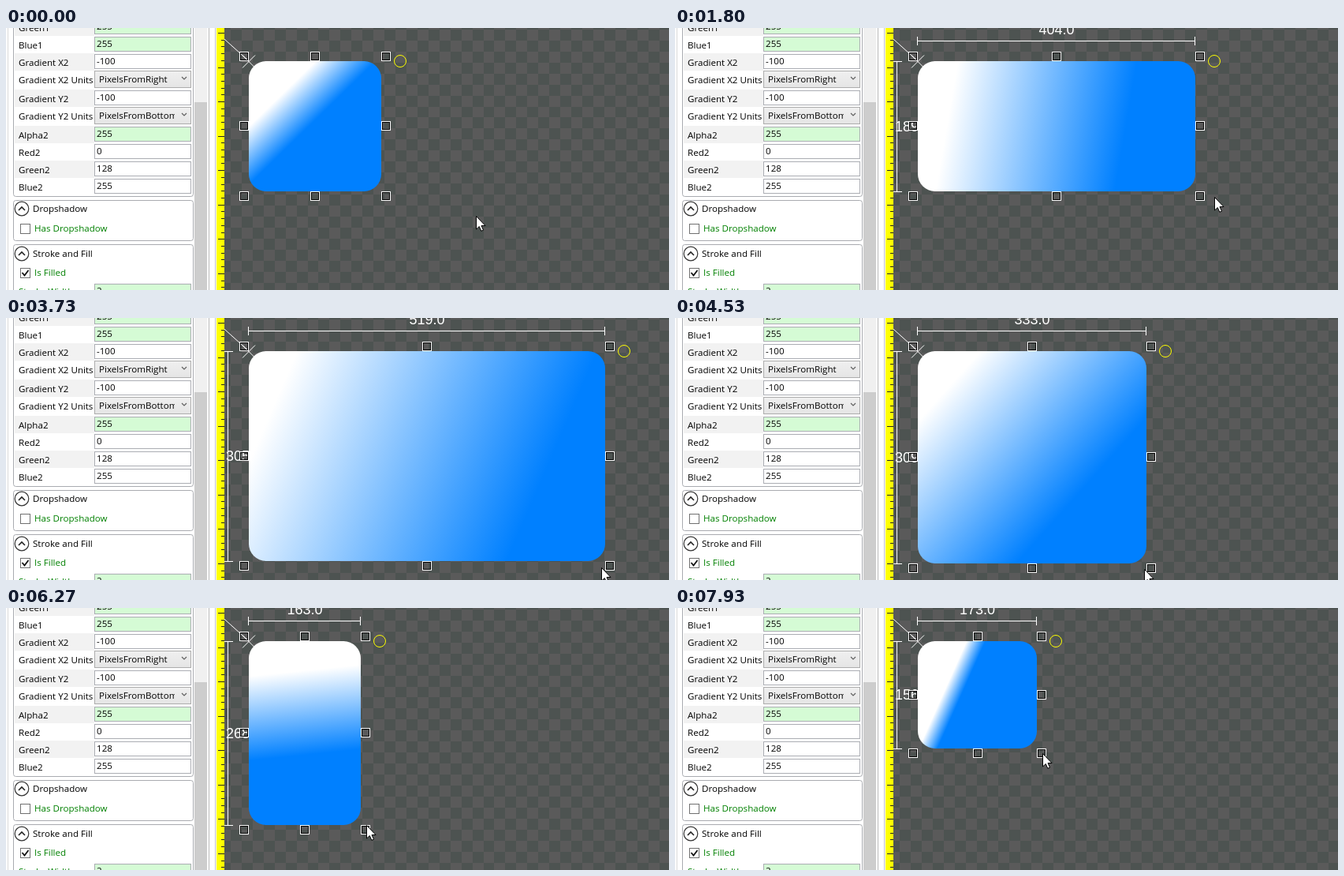
An HTML page with a canvas for the animation above (8 s loop, 841 by 332 pixels).

```html
<!DOCTYPE html>
<html lang="en">
<head>
<meta charset="utf-8">
<title>Gradient resize</title>
<style>
  html, body { margin: 0; width: 100%; height: 100%; overflow: hidden; background: #fff; }
  canvas { display: block; width: 841px; height: 332px; }
</style>
</head>
<body>
<canvas id="stage" width="841" height="332"></canvas>
<script>
const W = 841, H = 332, LOOP = 8000, STEP = 200 / 3;
const ctx = document.getElementById('stage').getContext('2d');

const UI_FONT = '11.6px "Open Sans", "Noto Sans", sans-serif';
const DIM_FONT = '18px "Liberation Sans", Arial, sans-serif';
const LEFT = 308, TOP = 42, ZOOM = 0.871, VIEW_X = 277;
const GRAB_AT = 460, REST = { x: 597, y: 238 };

// Where the dragged corner passes.
const DRAG = [
  { t: 800, x: 476, y: 207 },
  { t: 1200, x: 518, y: 207 },
  { t: 1600, x: 611, y: 207 },
  { t: 2533, x: 801, y: 209 },
  { t: 3333, x: 808, y: 283 },
  { t: 3733, x: 760, y: 308 },
  { t: 4200, x: 653, y: 312 },
  { t: 5067, x: 525, y: 309 },
  { t: 5533, x: 474, y: 305 },
  { t: 5933, x: 454, y: 299 },
  { t: 6867, x: 447, y: 216 },
  { t: 8067, x: 459, y: 177 }
];

function rate(i, axis) {
  const a = DRAG[i], b = DRAG[i + 1];
  return (b[axis] - a[axis]) / (b.t - a.t);
}

// Slope at a point that never overshoots its neighbours.
function slope(i, axis) {
  if (i === 0 || i === DRAG.length - 1) return 0;
  const a = rate(i - 1, axis), b = rate(i, axis);
  return a * b > 0 ? 2 * a * b / (a + b) : 0;
}

function cornerAt(t) {
  let i = 0;
  while (i < DRAG.length - 2 && t >= DRAG[i + 1].t) i++;
  const a = DRAG[i], b = DRAG[i + 1], span = b.t - a.t;
  const u = Math.max(0, Math.min(1, (t - a.t) / span));
  const s = u * u * (3 - 2 * u);
  const along = axis => Math.round(a[axis] + (b[axis] - a[axis]) * s +
    span * u * (1 - u) * ((1 - u) * slope(i, axis) - u * slope(i + 1, axis)));
  return { x: along('x'), y: along('y') };
}

// The pointer is one step ahead of the corner it drags.
function pointerAt(t) {
  const lead = cornerAt(t + STEP);
  const u = Math.min(1, t / GRAB_AT);
  const far = 1 - u * u * (3 - 2 * u);
  const x = lead.x + 8, y = lead.y + 7;
  return { x: Math.round(x + (REST.x - x) * far), y: Math.round(y + (REST.y - y) * far) };
}

function fill(color, x, y, w, h) {
  ctx.fillStyle = color;
  ctx.fillRect(x, y, w, h);
}

function box(x, y, w, h, border, inside) {
  if (inside) fill(inside, x, y, w, h);
  ctx.strokeStyle = border;
  ctx.lineWidth = 1;
  ctx.strokeRect(x + 0.5, y + 0.5, w - 1, h - 1);
}

function path(points, color, width = 1) {
  ctx.beginPath();
  points.forEach(([x, y]) => ctx.lineTo(x, y));
  ctx.strokeStyle = color;
  ctx.lineWidth = width;
  ctx.stroke();
}

function ring(x, y, r, color, width) {
  ctx.beginPath();
  ctx.arc(x, y, r, 0, Math.PI * 2);
  ctx.strokeStyle = color;
  ctx.lineWidth = width;
  ctx.stroke();
}

function label(text, x, middle, color = '#000') {
  ctx.font = UI_FONT;
  ctx.textAlign = 'left';
  ctx.fillStyle = color;
  ctx.fillText(text, x, middle + 4);
}

function group(y, h) {
  ctx.beginPath();
  ctx.roundRect(9.5, y + 0.5, 228, h, 3);
  ctx.fillStyle = '#fff';
  ctx.fill();
  ctx.strokeStyle = '#a9abb0';
  ctx.lineWidth = 1;
  ctx.stroke();
}

function header(text, y) {
  ring(20, y, 8.8, '#333', 1.2);
  path([[16, y + 2], [20, y - 2], [24, y + 2]], '#222', 1.6);
  label(text, 34, y);
}

function checkbox(text, y, checked) {
  box(18, y - 6, 13, 13, '#707070', '#fff');
  if (checked) path([[20.5, y], [23.5, y + 3.5], [28.5, y - 3]], '#111', 1.8);
  label(text, 36, y, '#008000');
}

function field(value, y, green) {
  box(112, y, 123, 19, '#abadb3', green ? '#d5fbd5' : '#fff');
  label(value, 115, y + 8.5);
}

function combo(value, y) {
  const shade = ctx.createLinearGradient(0, y, 0, y + 22);
  shade.addColorStop(0, '#f0f0f0');
  shade.addColorStop(1, '#e5e5e5');
  box(112, y, 123, 22, '#acacac', shade);
  ctx.save();
  ctx.beginPath();
  ctx.rect(116, y, 98, 22);
  ctx.clip();
  label(value, 118, y + 10.5);
  ctx.restore();
  path([[223, y + 8], [226, y + 11], [229, y + 8]], '#606060', 1.2);
}

const ROWS = {
  'Green1': '255',
  'Blue1': '255',
  'Gradient X2': '-100',
  'Gradient X2 Units': 'PixelsFromRight',
  'Gradient Y2': '-100',
  'Gradient Y2 Units': 'PixelsFromBottom',
  'Alpha2': '255',
  'Red2': '0',
  'Green2': '128',
  'Blue2': '255'
};
const GREEN = ['Green1', 'Blue1', 'Alpha2'];

function drawRows() {
  let y = -12;
  Object.entries(ROWS).forEach(([name, value], i) => {
    const isCombo = name.endsWith('Units');
    const h = isCombo ? 24 : 22;
    if (i % 2 === 0) fill('#f2f2f2', 11, y, 101, h);
    label(name, 16, y + 11.5);
    if (isCombo) combo(value, y);
    else field(value, y + 1, GREEN.includes(name));
    y += h;
  });
}

function drawPanel() {
  fill('#fff', 0, 0, 267, H);
  fill('#d9d9d9', 2, 0, 1, H);
  group(-20, 233);
  drawRows();

  group(218, 51);
  header('Dropshadow', 229);
  checkbox('Has Dropshadow', 254, false);

  group(274, 80);
  header('Stroke and Fill', 286);
  checkbox('Is Filled', 310, true);
  field('2', 324, true);
  label('Stroke Width', 16, 334, '#008000');

  fill('#f0f0f0', 239, 0, 16, H);
  fill('#cdcdcd', 239, 94, 16, H);
  fill('#b8b8b8', 257, 0, 1, H);
  fill('#c4c4c4', 265, 0, 1, H);
}

function drawRuler() {
  fill('#ff0', 267, 0, 10, H);
  for (let i = 0; i < 39; i++) {
    const w = i % 5 ? 4 : 8;
    fill('#222', VIEW_X - w, Math.round(6 + i * 10 * ZOOM), w, 1);
  }
}

function drawChecker() {
  const size = 16 * ZOOM;
  const colX = c => Math.round(285 + c * size);
  const rowY = r => Math.round(2 + r * size);
  fill('#4d5351', VIEW_X, 0, W - VIEW_X, H);
  for (let r = -1; r < 25; r++) {
    for (let c = -1; c < 41; c++) {
      if ((r + c) % 2) fill('#5a5a5a', colX(c), rowY(r), colX(c + 1) - colX(c), rowY(r + 1) - rowY(r));
    }
  }
}

function drawDims(right, bottom) {
  const size = length => Math.round(length / ZOOM).toFixed(1);
  fill('#fff', LEFT, 16, right - LEFT, 1);
  fill('#fff', 281, TOP, 1, bottom - TOP);
  for (const x of [LEFT - 1, right - 1]) fill('#fff', x, 11, 1, 11);
  for (const y of [TOP, bottom]) fill('#fff', VIEW_X, y, 11, 1);
  ctx.font = DIM_FONT;
  ctx.textAlign = 'center';
  ctx.fillText(size(right - LEFT), (LEFT + right) / 2, 8);
  ctx.textAlign = 'left';
  ctx.fillText(size(bottom - TOP), 279, (TOP + bottom) / 2 + 6);
}

function drawShape(right, bottom) {
  const inset = 100 * ZOOM;
  const blend = ctx.createLinearGradient(LEFT + 44, TOP + 40, right - inset, bottom - inset);
  blend.addColorStop(0, '#fff');
  blend.addColorStop(1, '#0080ff');
  ctx.beginPath();
  ctx.roundRect(LEFT, TOP, right - LEFT, bottom - TOP, 25 * ZOOM);
  ctx.fillStyle = blend;
  ctx.fill();
}

function drawHandles(right, bottom) {
  path([[262, 0.5], [LEFT, TOP]], '#fff');
  path([[300, 34.5], [316, 50.5]], '#fff');
  path([[300, 50.5], [316, 34.5]], '#fff');
  const xs = [LEFT - 6, Math.round((LEFT + right) / 2), right + 6];
  const ys = [TOP - 6, Math.floor((TOP + bottom) / 2), bottom + 6];
  xs.forEach((x, i) => ys.forEach((y, j) => {
    if (i === 1 && j === 1) return;
    box(x - 6, y - 6, 12, 12, '#fff');
    box(x - 5, y - 5, 10, 10, '#000');
  }));
  ring(right + 24, TOP, 7.5, '#ff0', 1);
}

function drawPointer({ x, y }) {
  const outline = [[0, 0], [0, 16.5], [3.8, 13], [6.3, 18.8], [9, 17.6], [6.5, 12], [11.5, 12]];
  ctx.beginPath();
  outline.forEach(([dx, dy]) => ctx.lineTo(x - 0.5 + dx, y + 0.5 + dy));
  ctx.closePath();
  ctx.fillStyle = '#fff';
  ctx.fill();
  ctx.strokeStyle = '#000';
  ctx.lineWidth = 1;
  ctx.stroke();
}

function draw(now) {
  const t = Math.floor((now % LOOP + 5) / STEP) * STEP % LOOP;
  const corner = cornerAt(t);
  drawChecker();
  if (t >= GRAB_AT) drawDims(corner.x, corner.y);
  drawShape(corner.x, corner.y);
  drawHandles(corner.x, corner.y);
  drawPointer(pointerAt(t));
  drawPanel();
  drawRuler();
}

const start = performance.now();
function tick() {
  draw(performance.now() - start);
  requestAnimationFrame(tick);
}
tick();
</script>
</body>
</html>
```
